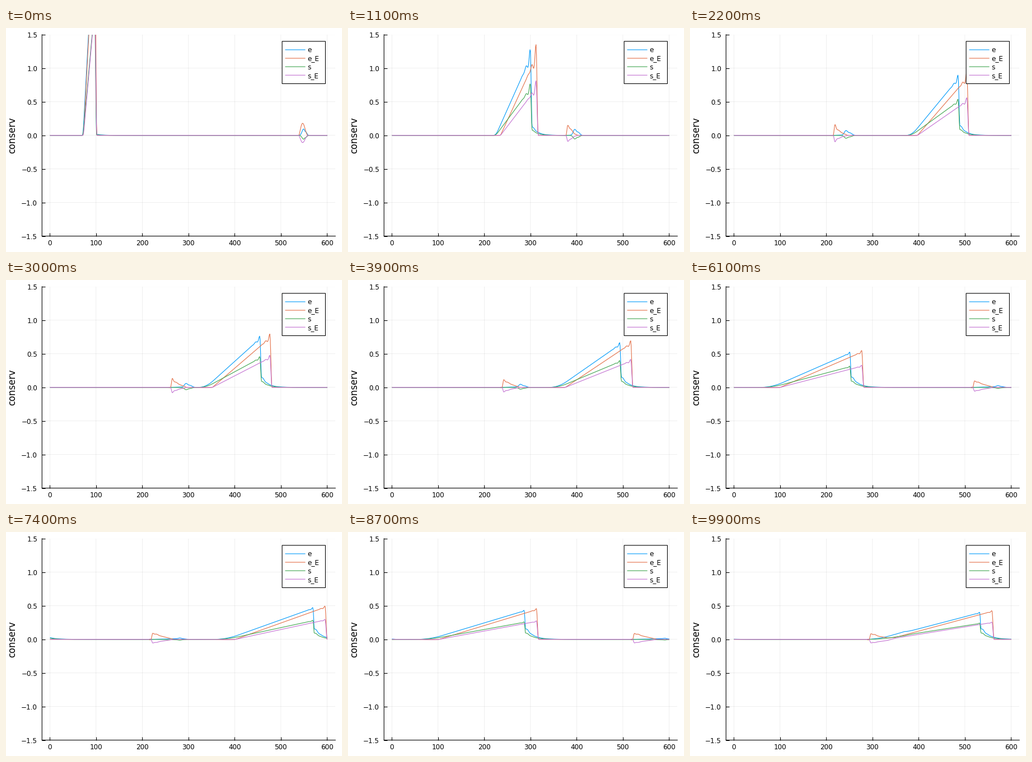
A matplotlib script that plays this animation: 600x400 px, repeating every 10000 ms.

```python
import numpy as np
import matplotlib.pyplot as plt
from matplotlib.animation import FuncAnimation
from matplotlib.patches import Rectangle

W, H, DPI = 600, 400, 100
PX = 72 / DPI
FRAMES, INTERVAL = 100, 100
PERIOD, SPEED = 600, 69.3
NAMES = ["e", "e_E", "s", "s_E"]
COLORS = ["#009afa", "#e36f47", "#3ea44e", "#c371d2"]
x = np.arange(1, PERIOD + 1)


def wrap(start, pad):
    """Distance from start on the periodic domain."""
    return (x - start + pad) % PERIOD - pad


def smooth(t):
    t = np.clip(t, 0, 1)
    return t * t * (3 - 2 * t)


def bell(t, width):
    return np.exp(-(t / width) ** 2)


def ramp(d, width, height, foot, over):
    """Soft-footed ramp that ends in a ringing shock at d = width."""
    back = width - d
    line = np.clip(d, 0, 2 * foot) ** 2 / (4 * foot) + np.clip(d - 2 * foot, 0, None)
    far = np.clip(back - 3, 0, None)
    ring = over * np.exp(-far / 5) * np.cos(2 * np.pi * far / 9)
    shape = line / (width - foot) + ring * (d > 0)
    return height * shape * smooth((back + 2.3) / 4.6)


def right_waves(n):
    width = np.sqrt(784 + 521 * n)
    height = 96 / width
    over = 0.1 * (110 / max(width, 80)) ** 1.6 * min(n / 10, 1)
    tail = 71.3 + SPEED * n
    d = wrap(tail, 100)
    exact = ramp(d, width, height, 1.5, over)
    exact -= 0.006 * (1 - np.exp(-n / 40)) * bell(d + 18, 18)

    lead = 1 + 50 * (1 - np.exp(-n / 38))
    lag = 0.5 + 26.3 * (1 - np.exp(-n / 18))
    wide = width + lead - lag
    foot = 1.5 + 28.5 * n * n / (n * n + 900)
    d = wrap(tail - lead, 100)
    approx = ramp(d, wide, height * (1 - 0.0005 * n), foot, 0.7 * over)

    past = np.clip(d - wide, 0, None)
    wake = (0.02 + 0.17 * (1 - np.exp(-n / 6))) * np.exp(-past / (11 + 0.05 * n))
    wake *= 1 + 0.12 * np.cos(2 * np.pi * (past - 6) / 10) * np.exp(-past / 10)
    return np.where(d > wide - 4, np.maximum(approx, wake), approx), exact


def left_waves(n):
    front = 538.7 - SPEED * n + 0.0015 * n * n
    d = wrap(front, 100)
    width = np.sqrt(400 + 28 * n)
    over = 0.01 + 0.07 * np.exp(-max(n - 22, 0) / 14)
    shock = (0.102 - 0.0002 * n) * np.clip(1 - d / width, 0, 1)
    shock += over * bell(d - 4, 2.8) + 0.012 * bell(d - 12.5, 4)
    shock *= smooth(d / 4)
    shock -= 0.008 * min(n / 60, 1) * bell(d + 2, 1.5)
    hump = 0.18 * np.sin(np.pi * np.clip(d / 20, 0, 1) ** 0.8) ** 2
    mix = np.exp(-n / 8)
    exact = mix * hump + (1 - mix) * shock

    gap = 10.3 + 0.82 * n - 0.0015 * n * n
    q = d - gap
    slow = 0.012 * (1 - np.exp(-n / 25))
    amp = 0.135 / (1 + (n / 36) ** 2.05) - slow
    r = q / min(1, 0.55 + n / 40)
    drop = 0.68 * bell(r, 5) + 0.37 * bell(r - 9, 6)
    approx = amp * np.where(q < 0, 0.7 * bell(q, 4.5), drop)
    lead = np.clip(d / gap, 0, 1) * np.exp(-np.clip(q, 0, None) / 6)
    return approx + slow * lead, exact


plt.rcParams["font.family"] = "DejaVu Sans"
plt.rcParams["path.snap"] = False
FONT = 12 * PX
fig = plt.figure(figsize=(W / DPI, H / DPI), dpi=DPI, facecolor="white")

left, right, top, bottom = 64.3, 588.2, 11.8, 371.6
ax = fig.add_axes([left / W, 1 - bottom / H, (right - left) / W, (bottom - top) / H])
ax.set(xlim=(-16.97, 617.97), ylim=(-1.5, 1.5))
ax.set_xticks(range(0, 601, 100))
ax.set_yticks(np.arange(-1.5, 1.6, 0.5))
ax.spines[["top", "right"]].set_visible(False)
ax.spines[["left", "bottom"]].set_linewidth(1.1 * PX)
ax.tick_params(direction="in", length=5.6 * PX, width=1.1 * PX, labelsize=FONT)
ax.tick_params(axis="x", pad=6.3 * PX)
ax.tick_params(axis="y", pad=8.2 * PX)
ax.set_axisbelow(True)
ax.grid(color="black", alpha=0.1, linewidth=0.6 * PX)
lines = [ax.plot([], [], color=c, lw=1.1 * PX)[0] for c in COLORS]

# Pixel layer for the label and the legend
layer = fig.add_axes([0, 0, 1, 1])
layer.set(xlim=(0, W), ylim=(H, 0))
layer.axis("off")
layer.text(11.6, 191.7, "conserv", fontsize=16.5 * PX, rotation=90,
           ha="center", va="center")
layer.add_patch(Rectangle((493.1, 23.8), 77.3, 75.6, fc="white", ec="black",
                          lw=1.1 * PX))
for i, (name, color) in enumerate(zip(NAMES, COLORS)):
    y = 38.9 + 15.12 * i
    layer.plot([499, 534], [y, y], color=color, lw=1.1 * PX)
    layer.text(538.4, y + 4.4, name, fontsize=FONT, va="baseline")


def update(n):
    r, r_exact = right_waves(n)
    l, l_exact = left_waves(n)
    curves = [r + l, r_exact + l_exact, 0.6 * (r - l), 0.6 * (r_exact - l_exact)]
    for line, y in zip(lines, curves):
        line.set_data(x, y)
    return lines


anim = FuncAnimation(fig, update, frames=FRAMES, interval=INTERVAL,
                     repeat=True, repeat_delay=0)
plt.show()
```
